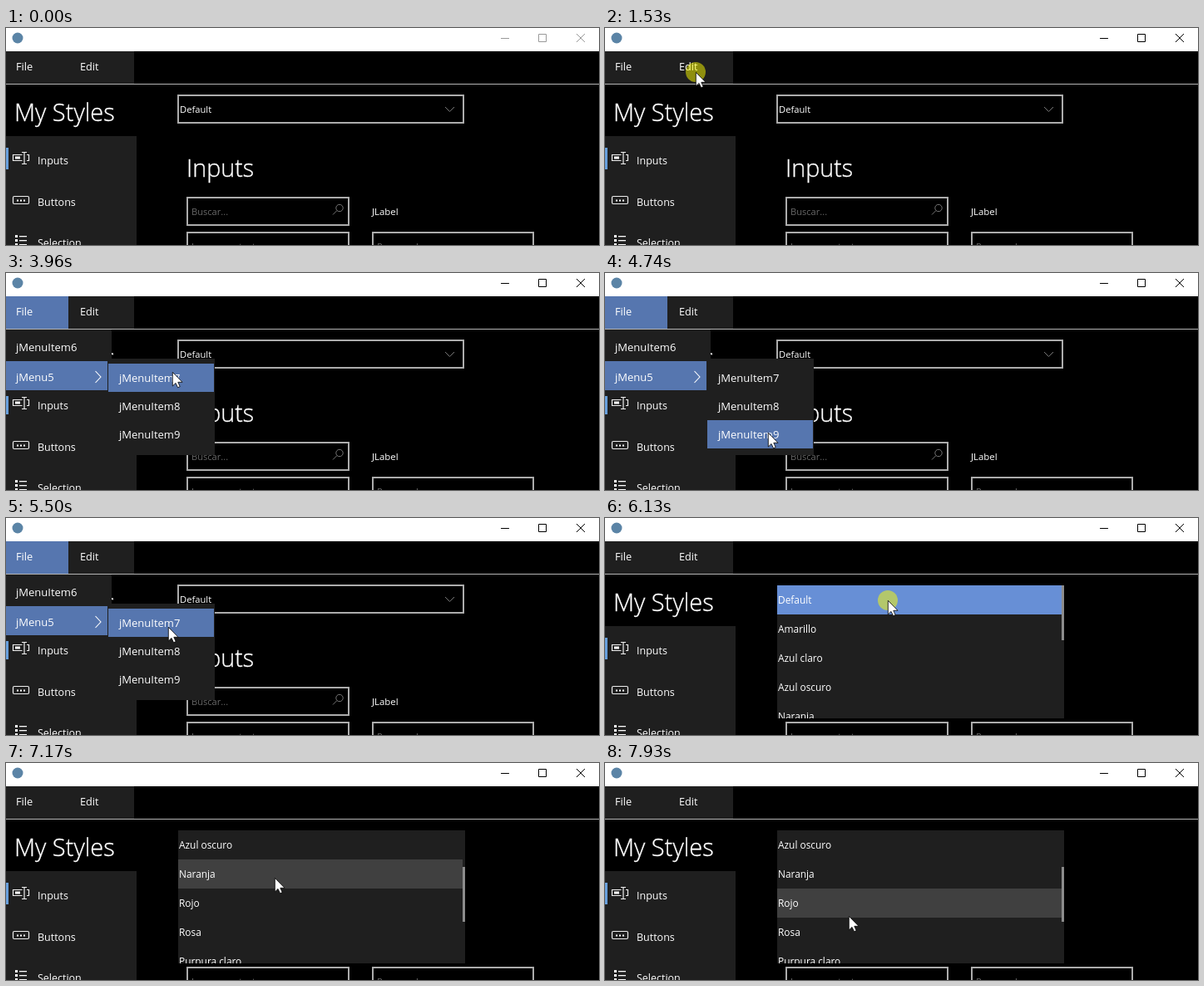
Write an HTML page that moves like this. It is 713x261 px and loops after 8000 ms.

```html
<!DOCTYPE html>
<html lang="es">
<head>
<meta charset="utf-8">
<title>My Styles</title>
<style>
  html, body { margin: 0; width: 100%; height: 100%; overflow: hidden; background: #000; }
  svg { display: block; width: 713px; height: 261px; }
  text { font-family: "Open Sans", "Noto Sans", sans-serif; fill: #fff; white-space: pre; }
  .title { font-weight: 300; stroke: #fff; stroke-width: .35; }
  .hint { fill: #686868; }
</style>
</head>
<body>
<svg id="stage" viewBox="0 0 713 261" xmlns="http://www.w3.org/2000/svg"></svg>
<script>
const LOOP = 8000, STEP = 70, PRESS = 140;
const PANEL = '#1f1f1f', BLUE = '#5676af', PICKED = '#678fd6', HOVER = '#404040';
const BORDER = '#acacac', GLYPH = '#777';
const stage = document.getElementById('stage');

const rect = (x, y, w, h, fill, extra = '') =>
  `<rect x="${x}" y="${y}" width="${w}" height="${h}" fill="${fill}" ${extra}/>`;
const text = (x, y, size, label, kind = '') =>
  `<text x="${x}" y="${y}" font-size="${size}" class="${kind}">${label}</text>`;
const line = (d, color, width = 1) =>
  `<path d="${d}" fill="none" stroke="${color}" stroke-width="${width}"/>`;
const field = (x, y, w, color = BORDER) =>
  rect(x + 1, y + 1, w - 2, 33, '#000', `stroke="${color}" stroke-width="2"`);
const within = (v, start, size) => v >= start && v < start + size;

// Moments at which the interface changes state
const clicks = { focus: 1460, edit: 1870, dismiss: 5850, list: 6130 };
const fileAt = 2150, submenuAt = 2850, scrollAt = 7030;

// Each glide ends at a time and place; the pointer rests in between.
const enter = { at: 130, x: 489, y: 219 };
const glides = [
  { at: 970, ms: 840, x: 35, y: 51 },
  { at: 1530, ms: 560, x: 109, y: 53 },
  { at: fileAt, ms: 280, x: 50, y: 50 },
  { at: 2920, ms: 770, x: 49, y: 116 },
  { at: 3960, ms: 690, x: 200, y: 119 },
  { at: 4810, ms: 780, x: 196, y: 193 },
  { at: 5500, ms: 490, x: 195, y: 131 },
  { at: 5780, ms: 280, x: 340, y: 99 },
  { at: 6680, ms: 210, x: 340, y: 109 },
  { at: 7310, ms: 630, x: 322, y: 140 },
  { at: 7930, ms: 210, x: 293, y: 184 }
];
const easeOut = k => 1 - (1 - k) ** 2;

function pointerAt(t) {
  let { x, y } = enter;
  for (const g of glides) {
    const spent = t - g.at + g.ms;
    if (spent < 0) break;
    const k = t >= g.at ? 1 : easeOut(Math.floor(spent / STEP) * STEP / g.ms);
    x += (g.x - x) * k;
    y += (g.y - y) * k;
    if (k < 1) break;
  }
  return [Math.round(x), Math.round(y)];
}

const colors = ['Default', 'Amarillo', 'Azul claro', 'Azul oscuro', 'Naranja', 'Rojo', 'Rosa',
  'Purpura claro', 'Purpura oscuro', 'Verde claro', 'Verde oscuro'];

function titleBar(active) {
  const ink = active ? '#000' : '#999';
  return rect(0, 0, 713, 28, '#fff') + '<circle cx="14" cy="12" r="6.5" fill="#5b84a6"/>' +
    line('M595 12.5h10M640.5 7.5h9v9h-9z', ink) + line('M686 7l10 10m0-10l-10 10', ink);
}

function menuBar(open) {
  return rect(0, 28, 154, 39, PANEL) +
    (open === 'file' ? rect(0, 28, 75, 39, BLUE) : '') +
    (open === 'edit' ? rect(76, 28, 78, 39, BLUE) : '') +
    text(12, 51, 12.8, 'File') + text(89, 51, 12.7, 'Edit') + rect(0, 67, 713, 1, '#b4b4b4');
}

function sidebar() {
  const labels = ['Inputs', 'Buttons', 'Selection'].map((s, i) => text(38, 164 + 49.5 * i, 12.5, s));
  const dots = [0, 1, 2].map(i => rect(13 + 4 * i, 206.5, 2, 2, '#fff'));
  const bullets = [0, 1, 2].map(i =>
    rect(11, 249 + 5 * i, 3, 3, '#fff') + rect(16, 250 + 5 * i, 9, 1.3, '#fff'));
  const inputIcon =
    line('M19.5 152.5h-11v7h11M25 152.5h2.5v7H25M19 149.5h6M22 149.5v14M19 163.5h6', '#eee', 1.2) +
    rect(11, 154.5, 6, 3, '#fff');
  return text(10, 112, 29, 'My Styles', 'title') + rect(0, 130, 157, 131, PANEL) +
    rect(0, 144, 3, 26, '#679fdc') + inputIcon +
    rect(8.5, 202.5, 19, 9, 'none', 'rx="1.5" stroke="#eee" stroke-width="1.2"') +
    [...dots, ...bullets, ...labels].join('');
}

function form(comboHover) {
  return field(206, 80, 345, comboHover ? '#e0e0e0' : BORDER) + text(209, 102, 11.2, 'Default') +
    line('M528 95l5.5 5.5l5.5-5.5', GLYPH) +
    text(217, 179, 28.7, 'Inputs', 'title') +
    field(217, 203, 196) + text(223, 225, 11.1, 'Buscar...', 'hint') +
    `<circle cx="401" cy="216.5" r="4.2" fill="none" stroke="${GLYPH}"/>` + line('M398 219.5l-5 5', GLYPH) +
    text(440, 225, 11.4, 'JLabel') +
    field(217, 245, 196) + text(223, 267, 11.1, 'Ingresa un texto', 'hint') +
    field(440, 245, 195) + text(446, 267, 11.1, 'Password', 'hint');
}

function fileMenu(x, y, submenu) {
  const onSecond = submenu || y >= 108;
  let out = rect(0, 68, 127, 80, PANEL) +
    (onSecond ? rect(0, 106, 122, 35, BLUE) : y > 70 ? rect(0, 73, 126, 33, BLUE) : '') +
    text(12, 94, 13, 'jMenuItem6') + text(12, 130, 13, 'jMenu5') +
    line('M107.5 118l6.5 7l-6.5 7', '#fff', 1.1);
  if (!submenu) return out;
  out += rect(122, 103, 129, 116, PANEL);
  for (let i = 0; i < 3; i++) {
    const top = 109 + 34 * i;
    if (within(x, 123, 127) && within(y, top, 34)) out += rect(123, top, 127, 34, BLUE);
    out += text(136, top + 22, 13, 'jMenuItem' + (7 + i));
  }
  return out;
}

function dropdown(y, scroll) {
  const row = 35, height = 160, total = colors.length * row;
  const rows = colors.map((name, i) => {
    const top = 81 + i * row - scroll;
    const fill = i === 0 ? PICKED : within(y, top, row) ? HOVER : PANEL;
    return rect(207, top, 342, row, fill) + text(208, top + 22, 11.9, name);
  });
  return rect(206, 80, 346, 36, '#000') +
    `<svg x="207" y="81" width="345" height="${height}" viewBox="207 81 345 ${height}">` +
    rect(207, 81, 345, height, PANEL) + rows.join('') +
    rect(549, 81 + Math.round(scroll * height / total), 3, 66, '#8c8c8c') + '</svg>';
}

function pointer(x, y, pressed) {
  const halo = `<circle cx="${x}" cy="${y}" r="12" fill="#ff0" fill-opacity=".5"/>`;
  return (pressed ? halo : '') + `<path transform="translate(${x} ${y})"
    d="M.3 .3V17L4 13.4L6.6 18.8L9.2 17.6L6.8 12.3H12Z" fill="#fff" stroke="#000" stroke-width=".8"/>`;
}

function draw(t) {
  const [x, y] = pointerAt(t);
  const open = within(t, clicks.edit, fileAt - clicks.edit) ? 'edit'
    : within(t, fileAt, clicks.dismiss - fileAt) ? 'file' : '';
  const comboHover = t > 5500 && within(x, 206, 345) && within(y, 80, 35);
  const pressed = Object.values(clicks).some(at => within(t, at, PRESS));
  stage.innerHTML = rect(0, 0, 713, 261, '#000') + titleBar(t >= clicks.focus) + menuBar(open) +
    sidebar() + form(comboHover) +
    (open === 'file' ? fileMenu(x, y, t >= submenuAt) : '') +
    (t >= clicks.list ? dropdown(y, t >= scrollAt ? 105 : 0) : '') +
    (t >= enter.at ? pointer(x, y, pressed) : '');
}

const begin = performance.now();
function tick() {
  draw((performance.now() - begin) % LOOP);
  requestAnimationFrame(tick);
}
tick();
</script>
</body>
</html>
```
